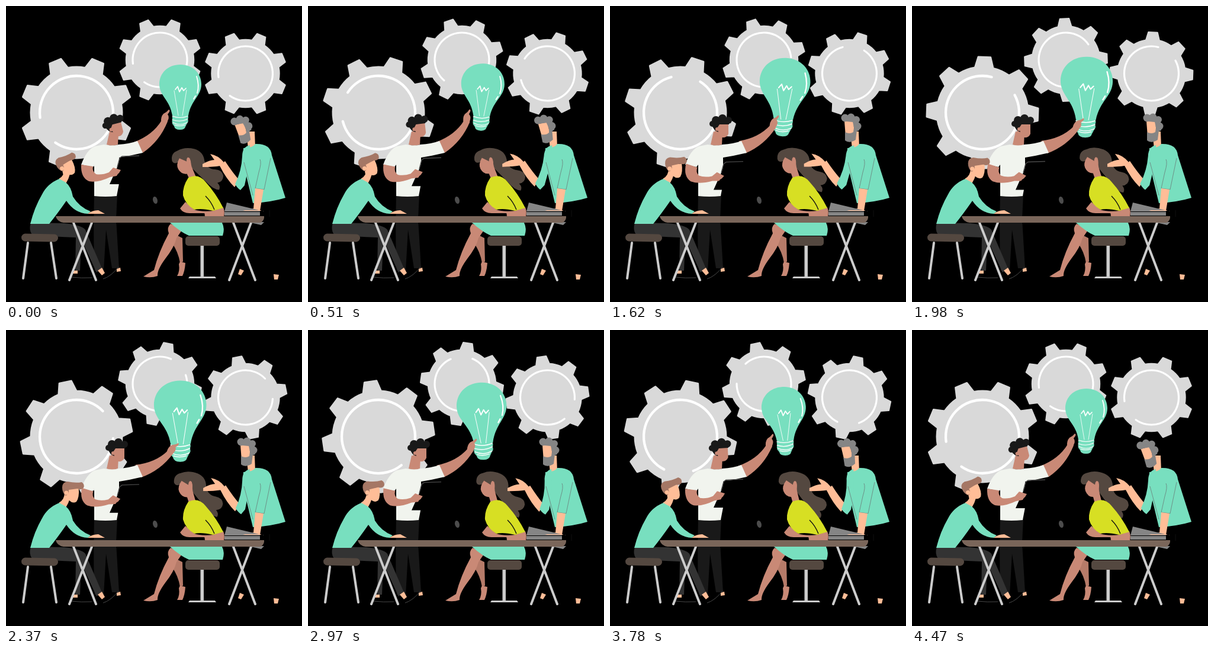
An HTML page for the animation above (4530 ms loop, 500 by 500 pixels).

```html
<!DOCTYPE html>
<html lang="en">
<head>
<meta charset="utf-8">
<title>Team with an idea</title>
<style>
html, body { margin: 0; width: 100%; height: 100%; overflow: hidden; background: #000; }
svg { display: block; width: 100vw; height: 100vh; }
.mint { fill: #78dfbf } .tan { fill: #c98976 } .peach { fill: #ffbd97 }
.steel { stroke: #ccc; stroke-width: 4; stroke-linecap: round; fill: none }
.white { stroke: #fff; fill: none; stroke-linecap: round; stroke-linejoin: round }
.crease { stroke: #111; fill: none }
.seam { stroke: #6b8a82; fill: none; stroke-width: .9 }
.shoe { stroke: #484848; fill: none }
.wood { fill: #544840 } .grey { fill: #858585 } .black { fill: #191919 }
</style>
</head>
<body>
<svg viewBox="0 0 500 500">
  <g id="gears"></g>

  <g id="bulb">
    <path class="mint" d="M294.5 99C316 99 330 114 330 132C330 152 313 158 308 185H281C277 158 259 152 259 132C259 114 273 99 294.5 99Z"/>
    <path class="mint" d="M282 184H307Q309 188 307 191Q309 195 306 198L303 204Q302 209 294 209Q285 209 284 203L281 199Q280 195 281 191Q280 187 282 184Z"/>
    <path class="white" stroke-width="1.2" d="M281 186Q294 191 307 186M281 192Q294 197 307 191M282 197Q294 203 306 197M285 201Q293 204 302 201"/>
    <path class="white" stroke-width=".8" d="M284 143L291 185M305 142L298 185"/>
    <path class="white" stroke-width="1.7" d="M286 141L290 136L293 145L297 138L300 143L304 139"/>
    <path class="white" stroke-width="1.9" d="M322 119Q327 134 323 147M320 152L317 157"/>
  </g>

  <g id="presenter">
    <path class="black" d="M149 319H188L186 360L191 443H179L169 378L165 447H150Q147 400 149 319Z"/>
    <path class="peach" d="M187 444L193 442L194 448L187 449Z"/>
    <g id="pointArm">
      <path class="tan" d="M216 230Q248 218 263 193L273 195Q260 228 231 248Z"/>
      <path id="pointHand" class="tan" d="M262 197Q261 187 266 182Q271 180 275 175Q279 176 273 183Q276 187 274 192L271 199Z"/>
    </g>
    <path class="tan" d="M170 234L175 212L190 216L189 234Q180 238 170 234Z"/>
    <path fill="#f1f4ee" d="M165 234Q180 237 190 234Q208 233 222 228L231 248Q210 253 191 256V300L187 321Q168 323 149 321V268L146 272L127 268Q136 243 150 237Z"/>
    <g id="tablet">
      <path d="M194 255L188 272L175 301H215L228 254Z"/>
      <path class="shoe" stroke-width="1.4" d="M188 272L192 257L196 254L225 253"/>
    </g>
    <path id="holdArm" class="tan" d="M127 268Q126 290 140 296Q155 299 176 289L187 287Q188 284 191 282L194 277L181 273L174 281Q162 286 152 284Q145 279 147 271Z"/>
    <g id="presenterHead">
      <path class="tan" d="M181 199H200V216Q197 223 190 222L175 221Z"/>
      <g class="black">
        <circle cx="173" cy="199" r="5"/><circle cx="179" cy="193" r="7"/>
        <circle cx="190" cy="190" r="7"/><circle cx="200" cy="193" r="6"/>
        <path d="M170 195H201V200H185L181 206L183 213Q175 211 172 200Z"/>
      </g>
      <circle class="tan" cx="181" cy="208" r="3"/>
    </g>
  </g>

  <g id="listener">
    <path fill="#333" d="M42 366L98 367Q128 370 134 378L162 443L153 450L127 394L125 447H117L118 391Q80 390 44 386Q38 378 42 366Z"/>
    <path class="peach" d="M114 447H121V452H112ZM155 447L162 442L167 451L162 455Z"/>
    <path class="shoe" d="M110 458Q127 460 145 459M164 461Q177 457 190 441"/>
    <path class="peach" d="M137 351Q146 345 156 345L167 351ZM89 292Q99 287 99 274L108 284Q106 292 101 300Z"/>
    <path class="mint" d="M90 292Q70 300 61 318Q48 340 41 368H73Q86 352 102 329Q116 350 138 351L143 347Q124 340 113 322Q110 305 101 298Z"/>
    <g id="listenerHead">
      <path class="peach" d="M103 268H123Q124 283 119 290Q113 294 107 288L99 288Z"/>
      <path fill="#a57765" d="M95 266Q95 257 104 256Q118 259 128 257Q134 261 131 267Q127 271 121 268L106 270Q107 277 101 280Q95 275 95 266Z"/>
      <circle class="peach" cx="102" cy="275" r="3.5"/>
    </g>
    <rect class="wood" x="26" y="385" width="62" height="13" rx="6.5" transform="rotate(1 57 391)"/>
    <path class="steel" d="M37 400L29 460M76 400L85 460"/>
  </g>

  <g id="writer">
    <path fill="#b67b69" d="M286 386L298 392L299 432L294 434Q291 415 280 400Z"/>
    <path class="tan" d="M278 368Q271 374 275 384Q258 415 250 446L232 457Q245 460 256 456Q255 446 269 427Q284 408 288 392L299 376Z"/>
    <path class="tan" d="M294 432L303 434Q302 448 298 456H289Q294 448 292 436Z"/>
    <path class="mint" d="M277 366H365Q370 376 366 388H309Q295 382 277 366Z"/>
    <rect class="wood" x="303" y="389" width="58" height="16" rx="5"/>
    <path fill="#ccc" d="M328.500 405H334V457H353L355 460H308L310 457H328.500Z"/>
    <g id="writerHead">
      <path class="wood" d="M285 256Q285 243 297 241Q310 236 326 243Q340 250 339 266Q341 280 354 283Q366 286 366 296Q364 306 354 306Q359 312 355 318Q345 316 335 300L310 266L300 258Q287 265 285 256Z"/>
      <path class="tan" d="M298 254Q290 264 293 272Q297 282 306 282L309 293H321L316 272L315 256L310 262Z"/>
      <ellipse class="tan" cx="312.500" cy="263" rx="3.500" ry="8"/>
    </g>
    <path class="tan" d="M367 340L350 346Q330 348 318 344L303 331L294 342Q299 350 310 350H333L337 356H368Q370 347 367 340Z"/>
    <path fill="#d7df23" d="M308 290Q325 282 337 297Q355 317 367 341L350 346Q330 341 318 344Q303 335 299 320Q298 305 308 290Z"/>
    <path class="crease" stroke-width="1.4" d="M337 321Q347 331 352 344"/>
  </g>

  <g id="elder">
    <path class="peach" d="M406 212H420L421 238L409 241Z"/>
    <path class="mint" d="M401 240Q417 240 421 233Q447 232 449 252L472 324Q450 331 417 333L400 262Z"/>
    <g id="sleeve">
      <g id="forearm">
        <path class="peach" d="M361 270L370 262Q384 283 394 294L386 306Q372 292 361 270Z"/>
        <path class="peach" d="M332 267Q344 260 352 260L345 250Q358 252 368 264L362 270Q350 272 332 272Z"/>
      </g>
      <path class="mint" d="M412 235Q399 238 399 254Q398 278 387 301Q391 308 396 311L403 303L410 270Z"/>
    </g>
    <path class="seam" d="M402 264L417 320M429 259Q432 265 427 281L421 308M447 257L436 310L421 308"/>
    <path class="peach" d="M421 308L435 310L429 346H405L418 342Z"/>
    <g id="elderHead">
      <path class="peach" d="M396 195H412V220H398Z"/>
      <g class="grey">
        <circle cx="397" cy="189" r="6.500"/><circle cx="407" cy="188" r="6.500"/>
        <circle cx="416" cy="192" r="6"/><circle cx="418" cy="203" r="6.500"/>
        <path d="M396 190H418L421 210L414 213L410 196L399 195Z"/>
        <path d="M397 213Q405 217 411 213L412 206L417 209L415 226Q404 233 397 227Z"/>
      </g>
    </g>
    <path class="peach" d="M395 444L402 447L397 455L392 453ZM452 453L461 454L459 462L453 462Z"/>
    <path class="crease" d="M445 345V356"/>
  </g>

  <g id="desk">
    <path class="grey" d="M373 332L436 347H369ZM369 348H429V354H369ZM409 365H436L431 370Z"/>
    <path class="peach" d="M404 345H430L431 346H400Z"/>
    <path d="M195 350H335Q337 353 334 355H195ZM429 346H434V355H429Z"/>
    <ellipse cx="252" cy="328" rx="3.800" ry="6.200" fill="#4c4c4c" transform="rotate(-15 252 328)"/>
    <path class="steel" d="M114 366L152 463M145 366L107 463M384 366L421 463M414 366L377 463"/>
    <path fill="#7a665a" d="M84 355H436Q437 362 430 366H97Q86 364 84 355Z"/>
  </g>
</svg>
<script>
const LOOP = 4530, END = 4470;
const gears = [
  { x: 119, y: 180, size: 1, spin: 1 },
  { x: 260, y: 91, size: 0.742, spin: -1 },
  { x: 404.5, y: 114, size: 0.742, spin: 1 }
];

const byId = id => document.getElementById(id);
const place = (id, transform) => byId(id).setAttribute('transform', transform);
const turnAbout = (id, x, y, angle) => place(id, `rotate(${angle} ${x} ${y})`);
const easeInOut = u => (1 - Math.cos(Math.PI * u)) / 2;

const polar = (r, deg) => {
  const a = deg * Math.PI / 180;
  return `${(r * Math.cos(a)).toFixed(2)} ${(r * Math.sin(a)).toFixed(2)}`;
};

function gearMarkup() {
  let rim = '';
  for (let a = 22.5; a < 360; a += 45) {
    rim += `${rim ? 'L' : 'M'}${polar(77, a - 11.5)}L${polar(94.3, a - 6.3)}L${polar(94.3, a + 6.3)}`
      + `L${polar(77, a + 11.5)}A77 77 0 0 1 ${polar(77, a + 33.5)}`;
  }
  return `<path d="${rim}Z" fill="#d9d9d9" stroke="#d9d9d9" stroke-width="3" stroke-linejoin="round"/>
    <path class="white" stroke-width="4.3" d="M${polar(62, 172)}A62 62 0 1 1 ${polar(62, 125)}"/>`;
}

byId('gears').innerHTML = gears.map((_, i) => `<g id="gear${i}">${gearMarkup()}</g>`).join('');

function draw(now) {
  const p = Math.min(now % LOOP, END) / END;
  const sway = Math.sin(2 * Math.PI * p);
  const lift = easeInOut(2 * p);                                      // up and back
  const hold = rate => easeInOut(Math.min(1, rate * Math.min(p, 1 - p))); // up, stay, back

  gears.forEach(({ x, y, size, spin }, i) =>
    place('gear' + i, `translate(${x} ${y}) scale(${size}) rotate(${spin * 360 * p})`));
  place('bulb', `translate(294.5 154) rotate(${3.3 * sway}) scale(${1 + 0.25 * lift}) translate(-294.5 -154)`);

  const carry = 9 * lift + 3.5 * sway;
  turnAbout('holdArm', 137, 275, carry);
  place('tablet', `translate(0 ${0.95 * carry})`);
  turnAbout('pointArm', 226, 238, 15 * lift ** 1.5);
  turnAbout('pointHand', 267, 194, 6 * lift - 4 * sway - 16 * sway ** 2);

  turnAbout('presenterHead', 183, 222, -14 * (1 - hold(4.5)));
  turnAbout('listenerHead', 97, 292, -24 * (1 - lift));
  turnAbout('elderHead', 413, 232, -16 * (1 - hold(3)));
  turnAbout('writerHead', 314, 285, -10 * (1 - Math.sin(Math.PI / 2 * p)));

  turnAbout('sleeve', 409, 245, 5 * sway);
  turnAbout('forearm', 393, 304, -6 * sway);
}

function loop() {
  draw(performance.now());
  requestAnimationFrame(loop);
}
loop();
</script>
</body>
</html>
```
